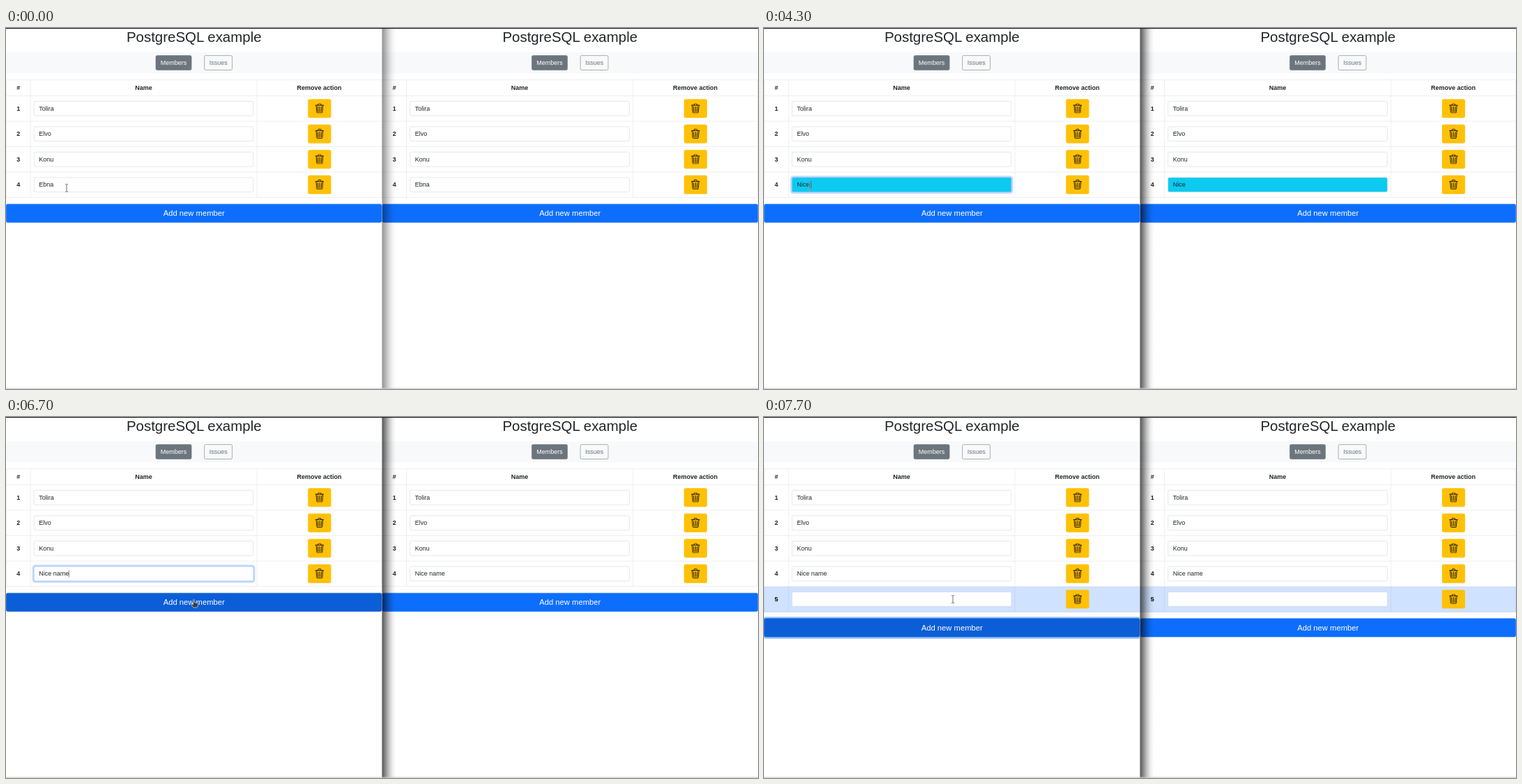
Write an HTML page that moves like this. It is 1079 px wide and 519 px high and loops after 8000 ms.

```html
<!DOCTYPE html>
<html lang="en">
<head>
<meta charset="utf-8">
<title>PostgreSQL example</title>
<style>
html, body { margin: 0; width: 100%; height: 100%; overflow: hidden; background: #fff; }
* { box-sizing: border-box; }
#stage {
  position: absolute; left: 0; top: 0; width: 1920px; height: 924px; overflow: hidden;
  transform: scale(.56198); transform-origin: 0 0;
  font: 16px/24px "Liberation Sans", Arial, sans-serif; color: #212529;
}
.pane { position: absolute; top: 0; width: 960px; height: 924px; padding-top: 2px; overflow: hidden; background: #fff; }
.pane + .pane { left: 960px; }
h1 { margin: 0 0 16px; height: 43.7px; font-size: 36.4px; line-height: 43.7px; font-weight: 400; text-align: center; }
nav { display: flex; justify-content: center; gap: 32px; height: 54px; padding: 8px; margin-bottom: 16px; background: #f8f9fa; }
nav span { height: 38px; padding: 6px 12px; border: 1px solid #6c757d; border-radius: 4px; color: #6c757d; }
nav span:first-child { background: #6c757d; color: #fff; }
.table { border-top: 1px solid #dee2e6; margin-bottom: 16px; }
.row { --line: #dee2e6; display: grid; grid-template-columns: 63px 578px 319px; height: 65px; }
.head { height: 41px; }
.cell {
  display: flex; align-items: center; justify-content: center; padding: 8px;
  border: solid var(--line); border-width: 0 1px 1px 0; font-weight: 700;
}
.cell:first-child { border-left-width: 1px; }
.new { --line: #bacbe6; background: #cfe2ff; color: #000; }
.field {
  width: 100%; height: 38px; padding: 6px 12px; font-weight: 400; white-space: pre;
  border: 1px solid #ced4da; border-radius: 4px; background: #fff; color: #212529;
}
.field.dirty { background: #0dcaf0; }
.field.focus { border-color: #86b7fe; box-shadow: 0 0 0 4px rgba(13,110,253,.25); }
.field span { position: relative; }
.field.marked span { background: #3daee9; color: #fff; }
.field.caret span::after { content: ""; position: absolute; left: 100%; top: 0; width: 1px; height: 18px; background: #212529; }
.trash { display: flex; align-items: center; justify-content: center; width: 59px; height: 48px; border-radius: 4.8px; background: #ffc107; }
.trash svg { width: 25px; height: 25px; fill: none; stroke: #000; stroke-linecap: round; }
.add {
  height: 48px; padding: 8px; border: 1px solid #0d6efd; border-radius: 4.8px;
  background: #0d6efd; color: #fff; font-size: 20px; line-height: 30px; text-align: center;
}
.add.hover, .add.done { background: #0b5ed7; border-color: #0a58ca; }
.add.busy, .add.done { box-shadow: 0 0 0 4px rgba(49,132,253,.5); }
.add.busy { opacity: .65; }
.add i { display: none; width: 16px; height: 16px; margin-left: 5.6px; vertical-align: -2px; border: 3.2px solid #fff; border-right-color: transparent; border-radius: 50%; transform: rotate(135deg); }
.add.busy i { display: inline-block; }
#shade { position: absolute; left: 960px; top: 0; width: 36px; height: 924px;
  background: linear-gradient(90deg, #000, rgba(0,0,0,.68) 25%, rgba(0,0,0,.34) 50%, rgba(0,0,0,.1) 75%, transparent); }
.edge { position: absolute; left: 0; width: 1920px; height: 1.8px; }
#pointer { position: absolute; left: 0; top: 0; width: 1079px; height: 519px; }
#pointer .ink { fill: #3b3f42; stroke: #fff; stroke-width: .6; stroke-linejoin: round; }
#pointer .beam { fill: none; }
</style>
</head>
<body>
<div id="stage">
  <div class="pane"></div>
  <div class="pane"></div>
  <div id="shade"></div>
  <div class="edge" style="top:0;background:#222"></div>
  <div class="edge" style="top:921px;background:#c8c8c8"></div>
</div>
<svg id="pointer" viewBox="0 0 1079 519">
  <g id="beam" class="beam">
    <path d="M-2 -5.5Q0 -5.5 0 -4.5Q0 -5.5 2 -5.5M0 -4.5V4.5M-2 5.5Q0 5.5 0 4.5Q0 5.5 2 5.5" stroke="#fff" stroke-opacity=".6" stroke-width="1.7"/>
    <path d="M-2 -5.5Q0 -5.5 0 -4.5Q0 -5.5 2 -5.5M0 -4.5V4.5M-2 5.5Q0 5.5 0 4.5Q0 5.5 2 5.5" stroke="#4a4d50" stroke-width=".8"/>
  </g>
  <path id="arrow" class="ink" d="M0 0V9L2 7.4L3.6 10.8L5.4 10L3.9 6.7L6.6 6.5Z"/>
  <path id="hand" class="ink" d="M-1 .8Q0 -.6 1 .8V4.6L5 5.4Q6.4 5.8 6.2 7.2L5.4 10.6Q5 12 3.8 12H.4Q-.8 12 -1.4 11L-3.6 7.8Q-3.6 6.4 -2.2 6.8L-1 7.8Z"/>
</svg>
<script>
const LOOP = 8000;
const NAMES = ["Tolira", "Elvo", "Konu", "Ebna"];
const TRASH = `<div class="trash"><svg viewBox="0 0 16 16"><path d="M1.5 3H14.5M5.5 3V1.5a1 1 0 0 1 1-1h3a1 1 0 0 1 1 1V3M2.55 3l.85 11.1a1.5 1.5 0 0 0 1.5 1.4h6.2a1.5 1.5 0 0 0 1.5-1.4L13.45 3M5 5.5l.5 8M8 5.5v8M11 5.5l-.5 8"/></svg></div>`;

const row = (cls, ...cells) =>
  `<div class="row ${cls}">${cells.map(c => `<div class="cell">${c}</div>`).join("")}</div>`;
const member = (name, i) =>
  row(i === 4 ? "new" : "", i + 1, `<div class="field"><span>${name}</span></div>`, TRASH);

const panes = [...document.querySelectorAll(".pane")].map(el => {
  el.innerHTML = `<h1>PostgreSQL example</h1>
    <nav><span>Members</span><span>Issues</span></nav>
    <div class="table">${row("head", "#", "Name", "Remove action")}${[...NAMES, ""].map(member).join("")}</div>
    <div class="add">Add new member<i></i></div>`;
  const field = el.querySelectorAll(".field")[3];
  return { field, text: field.firstChild, extra: el.querySelector(".new"), add: el.querySelector(".add") };
});
const shade = document.getElementById("shade");
const pointers = ["beam", "arrow", "hand"].map(id => document.getElementById(id));

// Each step changes only the listed parts of the state.
const STEPS = [
  [0, { left: "Ebna", right: "Ebna", field: "", rightField: "", add: "", row: false, shade: .42, at: ["beam", 87, 230] }],
  [1100, { field: "focus marked", shade: .66, at: ["beam", 65.5, 227] }],
  [3200, { left: "N", field: "focus dirty caret" }],
  [3400, { left: "Ni" }],
  [4300, { left: "Nice ", right: "Nice", rightField: "dirty" }],
  [4500, { left: "Nice n" }],
  [4800, { left: "Nice na" }],
  [5000, { left: "Nice name", right: "Nice n" }],
  [5200, { right: "Nice na", field: "focus dirty" }],
  [5400, { right: "Nice nam" }],
  [5500, { right: "Nice name" }],
  [6000, { field: "focus" }],
  [6200, { at: ["arrow", 101.8, 240] }],
  [6500, { field: "focus caret", add: "hover", at: ["hand", 238, 265] }],
  [6700, { rightField: "", at: ["hand", 269.5, 262] }],
  [7100, { field: "", add: "busy", at: ["arrow", 269.3, 262] }],
  [7500, { add: "done", row: true }],
  [7700, { at: ["beam", 271, 262] }],
];

function show(s) {
  [[s.left, s.field, s.add], [s.right, s.rightField, ""]].forEach(([text, field, add], i) => {
    const p = panes[i];
    p.text.textContent = text;
    p.field.className = "field " + field;
    p.add.className = "add " + add;
    p.extra.style.display = s.row ? "grid" : "none";
  });
  shade.style.opacity = s.shade;
  const [kind, x, y] = s.at;
  for (const el of pointers) {
    el.style.display = el.id === kind ? "inline" : "none";
    el.setAttribute("transform", `translate(${x} ${y})`);
  }
}

const start = performance.now();
let last = -1;
function tick() {
  const t = (performance.now() - start) % LOOP;
  const past = STEPS.filter(([at]) => at <= t);
  if (past.length !== last) {
    last = past.length;
    show(Object.assign({}, ...past.map(([, part]) => part)));
  }
  requestAnimationFrame(tick);
}
tick();
</script>
</body>
</html>
```
